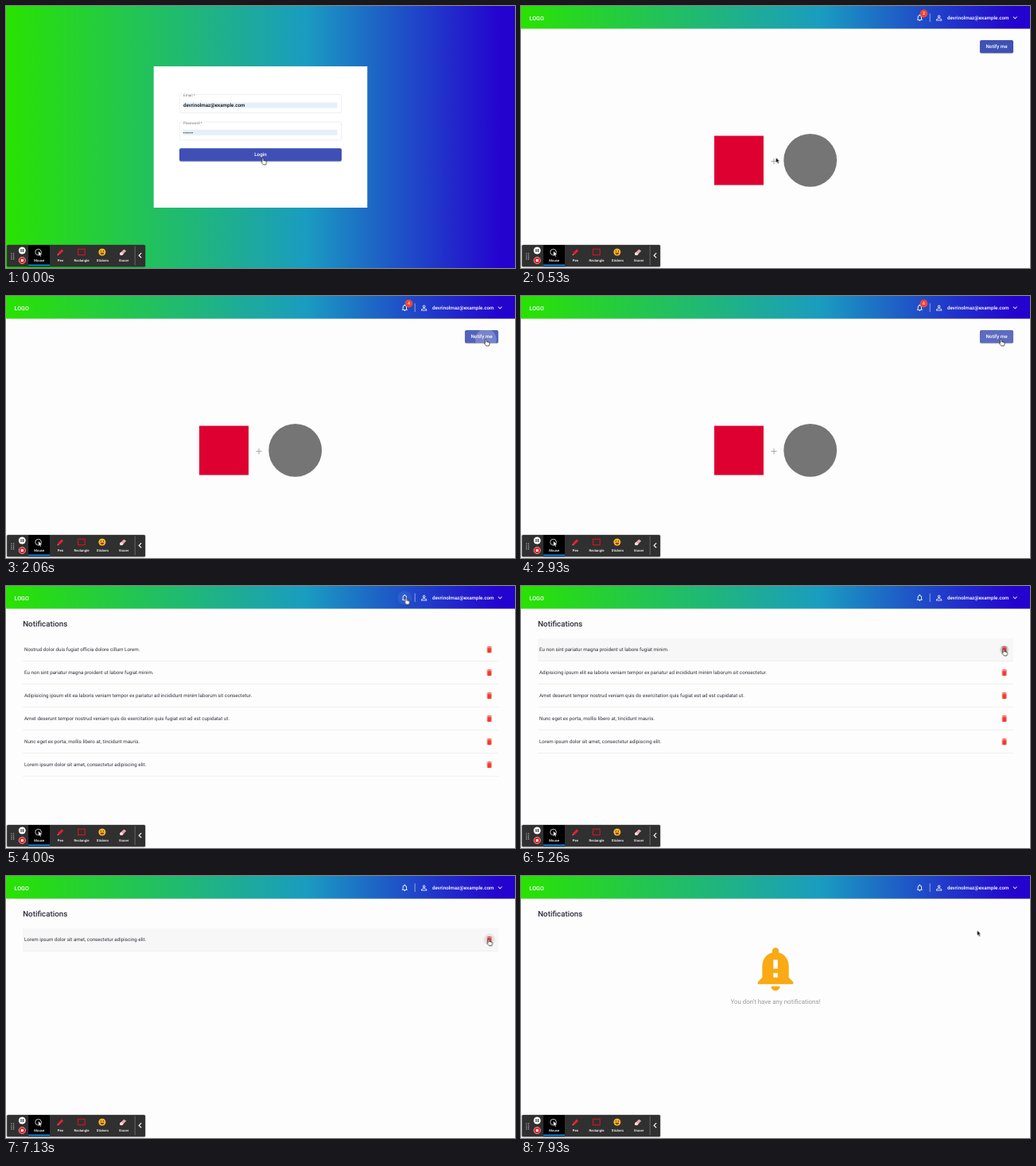
An HTML page that plays this animation: 640x330 px, repeating every 8 s.

```html
<!DOCTYPE html>
<html lang="en">
<head>
<meta charset="utf-8">
<title>Notifications demo</title>
<style>
  html, body { margin: 0; width: 100%; height: 100%; overflow: hidden; background: #fdfdfd; }
  svg { display: block; width: 100%; height: 100%; }
  text { font-family: Roboto, "Open Sans", sans-serif; font-size: 6.22px; text-rendering: geometricPrecision; }
  .mid { text-anchor: middle; }
  .med { font-weight: 500; }
  .white { fill: #fff; }
  .label { font-size: 4.67px; fill: #70707c; }
  .tool text { font-size: 4.25px; font-weight: 500; fill: #fff; text-anchor: middle; }
  .rows text { fill: #33333f; }

  /* hard changes share one 8 s clock */
  .cut { animation: 8s step-end infinite; }
  .login { animation-name: login; }
  .app { animation-name: app; }
  .home { animation-name: home; }
  .inbox { animation-name: inbox; }
  .empty { animation-name: empty; }
  .badge { animation-name: badge; }
  .count { animation-name: count; }
  .rows { animation-name: rows; }
  .row-hover { animation-name: row-hover; }
  .notify { animation-name: notify; }
  .bell-hover { animation-name: bell-hover; }
  .hand { animation-name: hand; }
  .arrow { animation-name: arrow; }
  .cursor { animation: move 8s ease-in-out infinite; }

  @keyframes login { 0% { visibility: visible } 6.6%, 100% { visibility: hidden } }
  @keyframes app { 0% { visibility: hidden } 6.6%, 100% { visibility: visible } }
  @keyframes home { 0% { visibility: hidden } 6.6% { visibility: visible } 46.6%, 100% { visibility: hidden } }
  @keyframes inbox { 0% { visibility: hidden } 46.6%, 100% { visibility: visible } }
  @keyframes empty { 0% { visibility: hidden } 90%, 100% { visibility: visible } }
  @keyframes badge { 0% { visibility: hidden } 6.6% { visibility: visible } 46.6%, 100% { visibility: hidden } }
  @keyframes count {
    0% { transform: none }
    20.75% { transform: translateY(-20px) }
    25% { transform: translateY(-40px) }
    29.1% { transform: translateY(-60px) }
    33.25%, 100% { transform: translateY(-80px) }
  }
  @keyframes rows {
    0% { transform: none }
    64.1% { transform: translateY(-29px) }
    69.1% { transform: translateY(-58px) }
    75% { transform: translateY(-87px) }
    80.75% { transform: translateY(-116px) }
    85.75% { transform: translateY(-145px) }
    90%, 100% { transform: translateY(-174px) }
  }
  @keyframes row-hover { 0% { visibility: hidden } 57.4% { visibility: visible } 90%, 100% { visibility: hidden } }
  @keyframes notify { 0% { fill: #3f51b5 } 17.4% { fill: #5363bc } 38.8%, 100% { fill: #3f51b5 } }
  @keyframes bell-hover { 0% { visibility: hidden } 43.3% { visibility: visible } 52.4%, 100% { visibility: hidden } }
  @keyframes hand {
    0% { visibility: visible } 6.6% { visibility: hidden }
    17.4% { visibility: visible } 38.8% { visibility: hidden }
    43.3% { visibility: visible } 52.4% { visibility: hidden }
    57.4% { visibility: visible } 90%, 100% { visibility: hidden }
  }
  @keyframes arrow {
    0% { visibility: hidden } 6.6% { visibility: visible }
    13.2% { visibility: hidden } 15.8% { visibility: visible }
    17.4% { visibility: hidden } 38.8% { visibility: visible }
    43.3% { visibility: hidden } 52.4% { visibility: visible }
    57.4% { visibility: hidden } 90%, 100% { visibility: visible }
  }
  @keyframes move {
    0%, 6.6% { transform: translate(320.5px, 191px) }
    18.3%, 38.2% { transform: translate(601px, 54px) }
    43.8%, 51.6% { transform: translate(500.5px, 14.5px) }
    58.3%, 93.2% { transform: translate(604.5px, 79px) }
    99%, 100% { transform: translate(573.6px, 68.6px) }
  }
  .ripple { opacity: 0; animation: ripple 8s linear var(--t) infinite; }
  @keyframes ripple {
    0% { opacity: .25; transform: scale(.2) }
    2.5% { opacity: .18; transform: scale(.8) }
    5%, 100% { opacity: 0; transform: scale(1) }
  }
</style>
</head>
<body>
<svg viewBox="0 0 640 330" preserveAspectRatio="none">
  <defs>
    <linearGradient id="sweep" gradientUnits="userSpaceOnUse" x1="0" x2="640">
      <stop offset="0" stop-color="#29e301"/>
      <stop offset=".59" stop-color="#1a9cc1"/>
      <stop offset=".97" stop-color="#2403ce"/>
    </linearGradient>
    <clipPath id="list"><rect x="0" y="66" width="640" height="264"/></clipPath>
    <clipPath id="dot"><circle cx="506.5" cy="9.5" r="5"/></clipPath>
    <clipPath id="loginClip"><rect x="218" y="179.3" width="204" height="16.4" rx="2"/></clipPath>
    <clipPath id="notifyClip"><rect x="577" y="43" width="42" height="16.4" rx="2"/></clipPath>
    <path id="trash" d="M6 19c0 1.1.9 2 2 2h8c1.1 0 2-.9 2-2V7H6v12zM19 4h-3.5l-1-1h-5l-1 1H5v2h14V4z"
      fill="#f03a2f" transform="translate(602.4 74.8) scale(.4444)"/>
    <g id="line">
      <path d="M21 94.6H619" stroke="#e4e4e4" stroke-width=".6"/>
      <use href="#trash"/>
    </g>
  </defs>

  <rect width="640" height="330" fill="#fdfdfd"/>

  <g class="cut login">
    <rect width="640" height="330" fill="url(#sweep)"/>
    <rect x="185.7" y="76" width="268.6" height="178" fill="#fff"/>
    <g fill="none" stroke="#e3e3ea" stroke-width=".6">
      <rect x="218.3" y="111.4" width="203.4" height="23" rx="2"/>
      <rect x="218.3" y="146" width="203.4" height="23" rx="2"/>
    </g>
    <path d="M222 109h17v5h-17zM222 144h26v5h-26z" fill="#fff"/>
    <path d="M222.6 121.4h194v7h-194zM222.6 155.8h194v7h-194z" fill="#e6f0fb"/>
    <text class="label" x="223" y="114">Email *</text>
    <text class="label" x="223" y="148.6">Password *</text>
    <text class="med" x="223" y="127" fill="#111">devrinolmaz@example.com</text>
    <text x="222.8" y="161.6" fill="#111">••••••</text>
    <rect x="218" y="179.6" width="204" height="17" rx="2" fill="#000" opacity=".18"/>
    <rect x="218" y="179.3" width="204" height="16.2" rx="2" fill="#3f4fb5"/>
    <g clip-path="url(#loginClip)"><g transform="translate(323 192)">
      <circle class="ripple white" r="110" style="--t:.06s"/>
    </g></g>
    <text class="mid med white" x="320" y="189.3">Login</text>
  </g>

  <g class="cut app">
    <rect width="640" height="28.6" fill="url(#sweep)"/>
    <text class="med white" x="10.6" y="17.5" style="font-size:7.1px">LOGO</text>
    <circle class="cut bell-hover white" cx="501.3" cy="14.8" r="8.9" opacity=".07"/>
    <g transform="translate(501.3 14.8)"><circle class="ripple white" r="9" style="--t:3.6s"/></g>
    <g class="white" fill-rule="evenodd">
      <path transform="translate(496 9.4) scale(.4444)" d="M12 22c1.1 0 2-.9 2-2h-4c0 1.1.9 2 2 2zm6-6v-5c0-3.07-1.63-5.64-4.5-6.32V4c0-.83-.67-1.5-1.5-1.5s-1.5.67-1.5 1.5v.68C7.64 5.36 6 7.92 6 11v5l-2 2v1h16v-1l-2-2zm-2 1H8v-6c0-2.48 1.51-4.5 4-4.5s4 2.02 4 4.5v6z"/>
      <path transform="translate(520.3 9.6) scale(.4444)" d="M12 4a4 4 0 100 8 4 4 0 000-8zm0 1.9a2.1 2.1 0 110 4.2 2.1 2.1 0 010-4.2zM12 13c-2.67 0-8 1.34-8 4v3h16v-3c0-2.66-5.33-4-8-4zm0 1.9c2.97 0 6.1 1.46 6.1 2.1v1.1H5.9V17c0-.64 3.13-2.1 6.1-2.1z"/>
      <path transform="translate(615.9 9.4) scale(.4444)" d="M16.59 8.59L12 13.17 7.41 8.59 6 10l6 6 6-6z"/>
    </g>
    <path d="M514.2 9.3V20" stroke="#fff" stroke-width=".6" opacity=".85"/>
    <text class="med white" x="536" y="16.6">devrinolmaz@example.com</text>
  </g>

  <g class="cut badge">
    <circle cx="506.5" cy="9.5" r="4.9" fill="#f44336"/>
    <g clip-path="url(#dot)">
      <g class="cut count">
        <text class="mid med white" style="font-size:5.33px">
          <tspan x="506.5" y="11.4">2</tspan><tspan x="506.5" dy="20">3</tspan><tspan x="506.5" dy="20">4</tspan><tspan x="506.5" dy="20">5</tspan><tspan x="506.5" dy="20">6</tspan>
        </text>
      </g>
    </g>
  </g>

  <g class="cut home">
    <rect x="576.8" y="43.6" width="42.4" height="16.6" rx="2" fill="#000" opacity=".2"/>
    <rect class="cut notify" x="577" y="43.1" width="42" height="16.2" rx="2" fill="#3f51b5"/>
    <g clip-path="url(#notifyClip)"><g transform="translate(603.3 54.5)">
      <circle class="ripple white" r="28" style="--t:1.63s"/>
      <circle class="ripple white" r="28" style="--t:1.97s"/>
      <circle class="ripple white" r="28" style="--t:2.3s"/>
      <circle class="ripple white" r="28" style="--t:2.6s"/>
    </g></g>
    <text class="mid med white" x="598" y="53.3">Notify me</text>
    <rect x="243" y="163.5" width="62" height="62" fill="#dd0031"/>
    <path d="M314.4 195.7h7.2M318 192.1v7.2" stroke="#a6a6a6" stroke-width="1"/>
    <circle cx="363.7" cy="194.4" r="33.4" fill="#757575"/>
  </g>

  <g class="cut inbox">
    <text class="med" x="21.2" y="51.1" fill="#2c2c3a" style="font-size:9.75px">Notifications</text>
    <rect class="cut row-hover" x="21" y="66" width="598" height="28.4" fill="#f7f7f7"/>
    <g clip-path="url(#list)">
      <g class="cut rows">
        <use href="#line"/>
        <use href="#line" y="29"/>
        <use href="#line" y="58"/>
        <use href="#line" y="87"/>
        <use href="#line" y="116"/>
        <use href="#line" y="145"/>
        <text x="23" y="81.9">Nostrud dolor duis fugiat officia dolore cillum Lorem.</text>
        <text x="23" y="110.9">Eu non sint pariatur magna proident ut labore fugiat minim.</text>
        <text x="23" y="139.9">Adipisicing ipsum elit ea laboris veniam tempor ex pariatur ad incididunt minim laborum sit consectetur.</text>
        <text x="23" y="168.9">Amet deserunt tempor nostrud veniam quis do exercitation quis fugiat est ad est cupidatat ut.</text>
        <text x="23" y="197.9">Nunc eget ex porta, mollis libero at, tincidunt mauris.</text>
        <text x="23" y="226.9">Lorem ipsum dolor sit amet, consectetur adipiscing elit.</text>
      </g>
    </g>
    <g transform="translate(607.7 80.2)" fill="#333">
      <circle class="ripple" r="8" style="--t:5.1s"/>
      <circle class="ripple" r="8" style="--t:5.5s"/>
      <circle class="ripple" r="8" style="--t:5.97s"/>
      <circle class="ripple" r="8" style="--t:6.43s"/>
      <circle class="ripple" r="8" style="--t:6.83s"/>
    </g>
  </g>

  <g class="cut empty">
    <path fill="#f9aa14" transform="translate(286.7 83.4) scale(2.778)" d="M18 16v-5c0-3.07-1.64-5.64-4.5-6.32V4c0-.83-.67-1.5-1.5-1.5s-1.5.67-1.5 1.5v.68C7.63 5.36 6 7.92 6 11v5l-2 2v1h16v-1l-2-2zm-5 0h-2v-2h2v2zm0-4h-2V8h2v4zm-1 10c1.1 0 2-.9 2-2h-4c0 1.1.89 2 2 2z"/>
    <text class="mid" x="320" y="161.4" fill="#999" style="font-size:7.95px">You don't have any notifications!</text>
  </g>

  <g class="tool">
    <rect x=".6" y="300.4" width="175" height="28.8" rx="2" fill="#000" opacity=".3"/>
    <rect x="1.2" y="301" width="173.8" height="27.2" rx="1.5" fill="#303030"/>
    <path d="M7 311.2v8M9.6 311.2v8" stroke="#c8c8c8" stroke-width="1.1" stroke-dasharray="1.1 1.2"/>
    <circle cx="20.3" cy="308" r="4.5" fill="#fff"/>
    <path d="M19.1 305.9v4.2M21.5 305.9v4.2" stroke="#222" stroke-width="1.1"/>
    <circle cx="20.3" cy="320.4" r="4.2" fill="#e5202b" stroke="#f6d5d5" stroke-width=".6"/>
    <rect x="18.8" y="318.9" width="3" height="3" fill="#fff"/>
    <rect x="28.2" y="301" width="26.8" height="27.2" fill="#000"/>
    <rect x="28.2" y="325.6" width="26.8" height="1.8" fill="#1190ee"/>
    <circle cx="40.6" cy="310" r="3.8" fill="none" stroke="#eee" stroke-width=".8"/>
    <path d="M40.8 308.8v6.2l1.5-1.3 1 2 1-.5-1-1.9 2-.2z" fill="#fff" stroke="#000" stroke-width=".3"/>
    <text x="41.8" y="321.6">Mouse</text>
    <path d="M64.6 314l.9-3 4.6-4.7 2.1 2.1-4.6 4.7z" fill="#e9202c"/>
    <path d="M64.6 314l.5-1.6 1.1 1.1z" fill="#f3c9b0"/>
    <text x="68.4" y="321.6">Pen</text>
    <rect x="90.6" y="306.2" width="8.6" height="7.4" fill="none" stroke="#e3131f" stroke-width="1"/>
    <text x="95" y="321.6">Rectangle</text>
    <circle cx="120.9" cy="310" r="4.5" fill="#f6b928"/>
    <circle cx="119.4" cy="308.8" r=".7" fill="#4b2b08"/>
    <circle cx="122.4" cy="308.8" r=".7" fill="#4b2b08"/>
    <path d="M118.5 310.8h4.8a2.4 2.2 0 01-4.8 0z" fill="#9a3412"/>
    <text x="121.6" y="321.6">Stickers</text>
    <path d="M143 311.6l5.2-5.2 3 2.2-5.2 5.3-2.4-.2z" fill="#eea3ab"/>
    <path d="M143 311.6l1.7-1.7 3 2.3-1.7 1.7-2.4-.2z" fill="#f7e3e3"/>
    <text x="148.2" y="321.6">Eraser</text>
    <path d="M162.2 302.4v24" stroke="#8b8b8b" stroke-width=".6"/>
    <path d="M170.2 311.2l-3 3 3 3" fill="none" stroke="#fff" stroke-width="1.2"/>
  </g>

  <g class="cursor">
    <path class="cut hand" d="M2.3.4c.6 0 .9.4.9.9v2.3l2.9.6c.8.2 1.1.6 1 1.4l-.4 2.2-.6 1.1H3.1L.7 6.2c-.5-.7.2-1.2.8-.8V1.3c0-.5.3-.9.8-.9z" fill="#fff" stroke="#111" stroke-width=".7"/>
    <path class="cut arrow" d="M0 0v6.2l1.4-1.3 1.1 2.5 1.2-.5-1.1-2.4h1.9z" fill="#000" stroke="#fff" stroke-width=".35"/>
  </g>
</svg>
</body>
</html>
```
